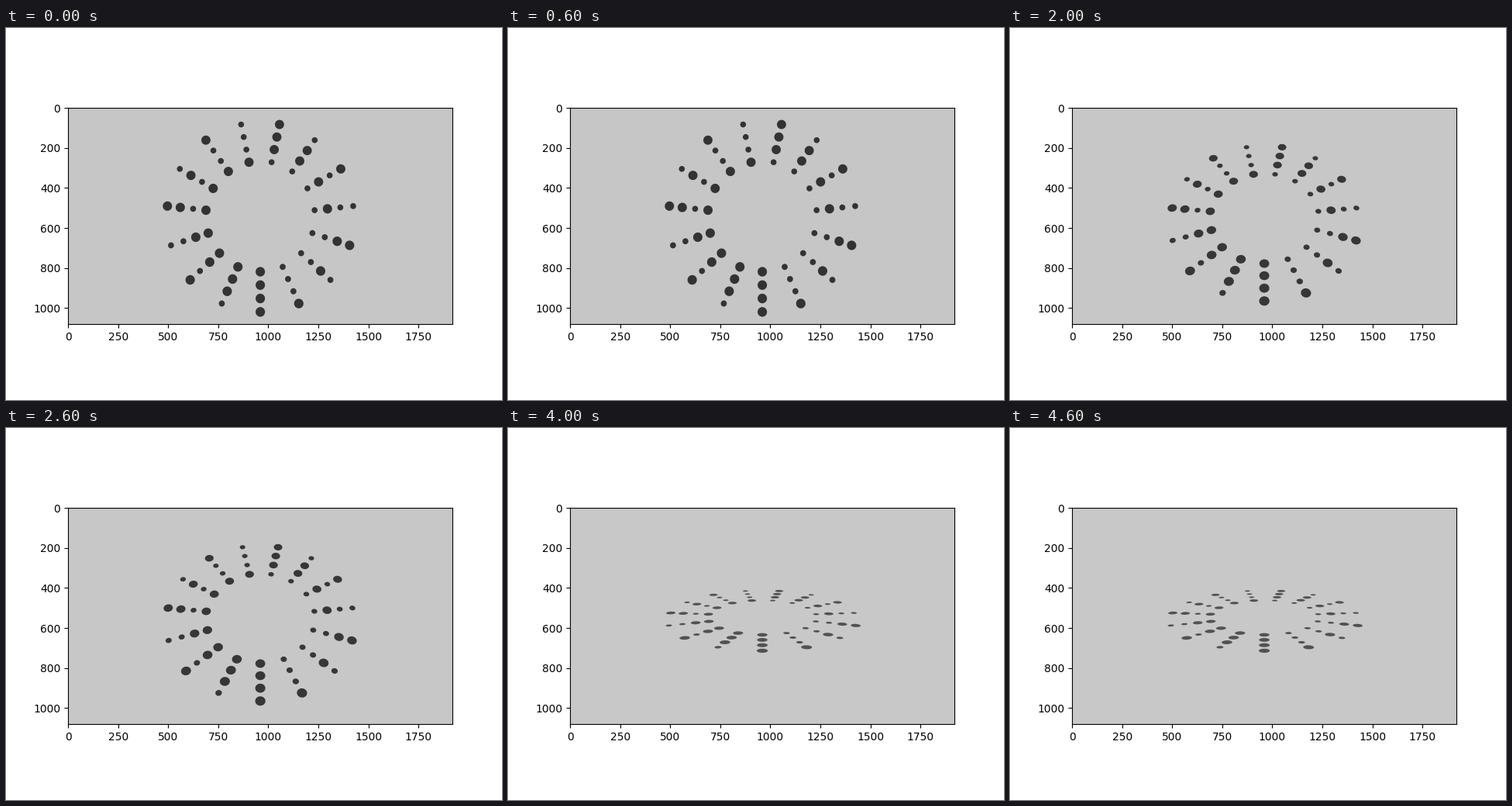
Animation, 640 px wide and 480 px high, one loop 5000 ms. Source, as a matplotlib script:

```python
import numpy as np
import matplotlib.pyplot as plt
from matplotlib.animation import FuncAnimation
from matplotlib.collections import PolyCollection

W, H = 1920, 1080
SPOKES, BITS = 15, 4
INNER, STEP = 273, 64.7        # ring radii
SMALL, BIG = 14.8, 23.2        # dot radii
DIST = 2866                    # camera distance
ASPECT = 1.016                 # vertical to horizontal focal length
TILT_STEP, MIN_TILT = 18, 4.6  # degrees
DOT_GREY = (51, 52, 55, 60, 82)
BACK_GREY = (198, 198, 199, 199, 200)


def make_dots():
    """Each spoke n shows the binary digits of n, highest bit innermost."""
    turn = np.linspace(0, 2 * np.pi, 48, endpoint=False)
    circle = np.column_stack([np.cos(turn), np.sin(turn)])
    dots = []
    for n in range(1, SPOKES + 1):
        a = 2 * np.pi * n / SPOKES
        for ring in range(BITS):
            bit = n >> (BITS - 1 - ring) & 1
            r = INNER + STEP * ring
            centre = r * np.array([np.sin(a), np.cos(a)])
            dots.append(centre + (BIG if bit else SMALL) * circle)
    return np.array(dots)


def project(points, degrees):
    """Tip the top of the disc away from the viewer, with perspective."""
    t = np.radians(degrees)
    x, y = points[..., 0], points[..., 1]
    scale = 1 / (1 - y * np.sin(t) / DIST)
    return np.stack([W / 2 + x * scale,
                     H / 2 + ASPECT * y * np.cos(t) * scale], axis=-1)


def grey(level):
    return (level / 255,) * 3


fig, ax = plt.subplots(figsize=(6.4, 4.8), dpi=100)
ax.set_aspect("equal")
ax.set_xlim(-0.5, W - 0.5)
ax.set_ylim(H - 0.5, -0.5)

DOTS = make_dots()
disc = PolyCollection([], linewidths=0)
ax.add_collection(disc, autolim=False)


def update(i):
    disc.set_verts(project(DOTS, max(MIN_TILT, TILT_STEP * i)))
    disc.set_facecolor(grey(DOT_GREY[i]))
    ax.set_facecolor(grey(BACK_GREY[i]))
    return disc,


anim = FuncAnimation(fig, update, frames=len(DOT_GREY), interval=1000,
                     repeat=True, repeat_delay=0)
plt.show()
```
